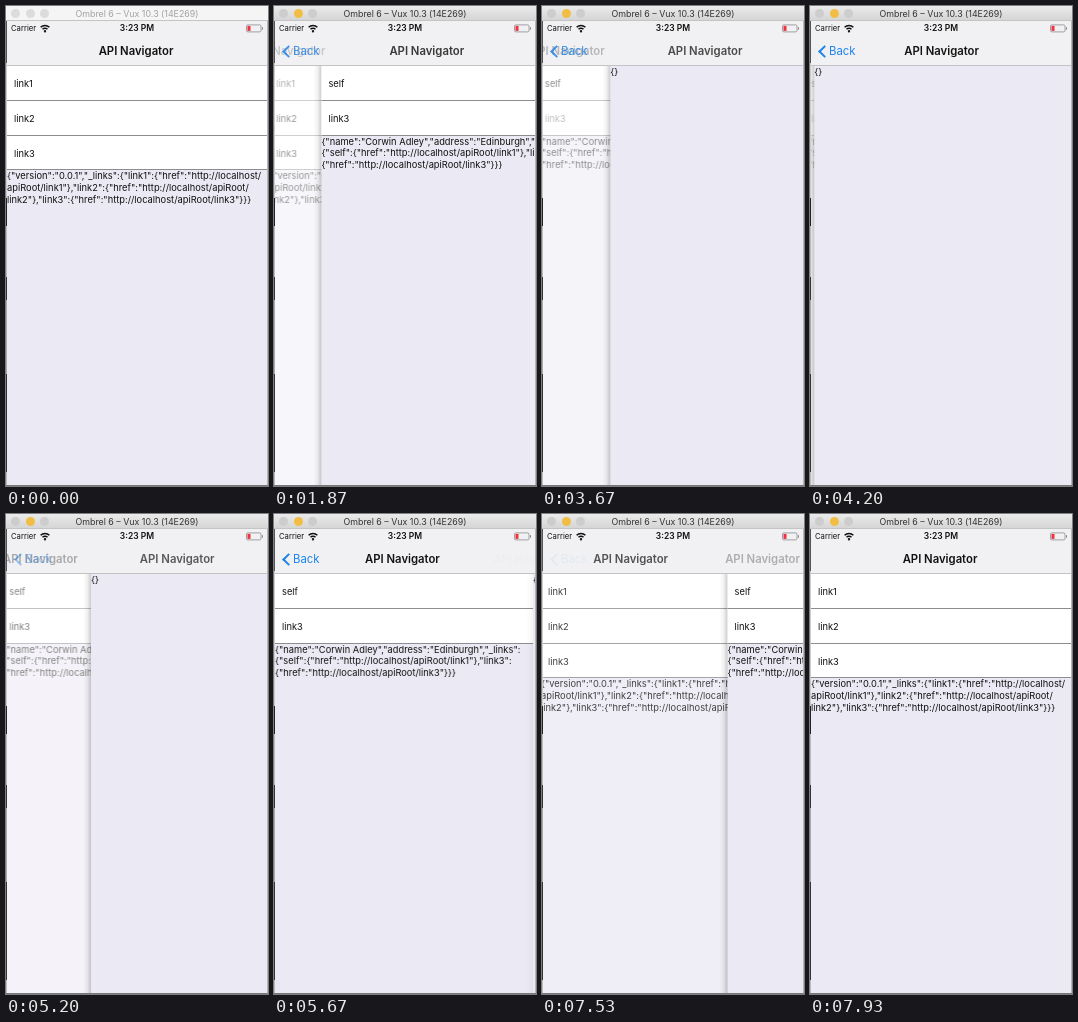
An HTML page for the animation above (8000 ms loop, 262 by 480 pixels).

```html
<!DOCTYPE html>
<html lang="en">
<head>
<meta charset="utf-8">
<title>API Navigator</title>
<style>
/* --a and --b: how far the second and third screens are pushed in */
@property --a { syntax: "<number>"; inherits: true; initial-value: 0; }
@property --b { syntax: "<number>"; inherits: true; initial-value: 0; }

html, body { margin: 0; width: 100%; height: 100%; overflow: hidden; background: #fff; }
#stage {
  position: relative; width: 262px; height: 480px; overflow: hidden;
  font: 9.32px/11.7px Inter, Roboto, sans-serif; color: #111;
  animation: 8s cubic-bezier(.19, .71, .45, .95) infinite;
  animation-name: first, second;
}
#stage * { position: absolute; box-sizing: border-box; white-space: pre; }

@keyframes first {
  0%, 22.45% { --a: 0; }
  22.46% { --a: .74; }
  31.6%, 91.75% { --a: 1; }
  99.06%, 100% { --a: 0; }
}
@keyframes second {
  0%, 45.82% { --b: 0; }
  45.83% { --b: .736; }
  55%, 64.25% { --b: 1; }
  71.6%, 100% { --b: 0; }
}

/* window frame */
#bar {
  left: 0; top: 0; width: 262px; height: 15px;
  background: linear-gradient(#ebebeb, #d5d5d5); border-bottom: 1px solid #c4c4c4;
}
#bar b {
  left: 0; width: 262px; top: 2px; text-align: center;
  font-weight: 400; font-size: 8.85px; color: #333;
}
#bar i { top: 3px; width: 9px; height: 9px; border-radius: 50%; background: #cdcdcd; }
#idle { inset: 0; background: #f5f5f5; animation: idle 8s step-end infinite; }
#idle b { color: #a2a2a2; }
#bar #idle i { background: #dcdcdc; }
@keyframes idle { 0% { opacity: 1; } 19.1%, 100% { opacity: 0; } }
#left {
  left: 0; top: 15px; width: 1px; height: 465px;
  background: linear-gradient(#555 0 9%, #ccc 9% 38%, #222 38% 44%, #bbb 44% 55%, #333 55% 60%, #aaa 60% 76%, #333 76% 97%, #bbb 97%);
}
#right { right: 0; top: 15px; width: 1px; height: 465px; background: #b5b5b8; }
#foot { left: 0; top: 479px; width: 262px; height: 1px; background: #77777a; }

/* status and navigation bars */
#head {
  left: 1px; top: 15px; width: 260px; height: 45px; overflow: hidden;
  background: #f1f1f3; border-bottom: 1px solid #c3c3c6;
}
#carrier { left: 4px; top: 2px; font-size: 7.7px; }
#clock { left: 0; width: 260px; top: 2px; text-align: center; font-size: 8.5px; font-weight: 600; }
#head svg { left: 0; top: 0; }
.title {
  left: -1px; width: 260px; top: 22px; line-height: 16px; text-align: center;
  font-size: 11.3px; font-weight: 600;
  opacity: var(--o); transform: translateX(var(--x));
}
.back { left: 0; top: 22px; width: 60px; height: 16px; opacity: var(--o); }
.back span { left: 18px; top: 0; font-size: 11.4px; line-height: 16px; color: #1b82ea; }
.back u {
  left: 9px; top: 3.5px; width: 9px; height: 9px; transform: rotate(45deg);
  border: solid #1b82ea; border-width: 0 0 2px 2px;
}
.press { inset: 0; }
.n0 { --o: calc(1 - var(--a)); --x: calc(var(--a) * -141px); }
.n1 {
  --o: calc(var(--a) * (1 - var(--b)));
  --x: calc((1 - var(--a)) * 128px - var(--b) * 141px);
}
.n2 { --o: var(--b); --x: calc((1 - var(--b)) * 128px); }
.n1 .press { animation: press1 8s step-end infinite; }
.n2 .press { animation: press2 8s step-end infinite; }
@keyframes press1 { 0% { opacity: 1; } 90.85%, 100% { opacity: .22; } }
@keyframes press2 { 0% { opacity: 1; } 61.6% { opacity: .22; } 72%, 100% { opacity: 1; } }

/* screens */
#body { left: 1px; top: 60px; width: 260px; height: 419px; overflow: hidden; background: #fff; }
.card {
  inset: 0; background: #ebe9f3;
  opacity: min(1 - .7 * var(--out, 0), (1 - var(--out, 0)) * 30);
  transform: translateX(calc((1 - var(--in, 1)) * 261px - var(--out, 0) * 7px));
}
.card::before {
  content: ""; position: absolute; left: -8px; top: 0; width: 8px; height: 100%;
  background: linear-gradient(90deg, #0000, #0000000d 50%, #0003); opacity: calc(var(--in, 0) * 20);
}
#c0 { --out: var(--a); }
#c1 { --in: var(--a); --out: var(--b); }
#c2 { --in: var(--b); }
#stage .row {
  position: relative; height: 34.8px; padding-left: 7px; line-height: 35.6px;
  background: #fff; border-bottom: 1px solid #8d8d90;
}
#stage .row span, #stage .json { position: relative; }
#tap1 { animation: tap1 8s step-end infinite; }
#tap2 { animation: tap2 8s step-end infinite; }
@keyframes tap1 { 0% { opacity: 1; } 19.1% { opacity: .75; } 31.6%, 100% { opacity: 1; } }
@keyframes tap2 { 0% { opacity: 1; } 40.85% { opacity: .55; } 55%, 100% { opacity: 1; } }
</style>
</head>
<body>
<div id="stage">
  <div id="body">
    <div class="card" id="c0"><div class="row"><span id="tap1">link1</span></div><div class="row"><span>link2</span></div><div class="row"><span>link3</span></div><div class="json">{"version":"0.0.1","_links":{"link1":{"href":"http://localhost/
apiRoot/link1"},"link2":{"href":"http://localhost/apiRoot/
link2"},"link3":{"href":"http://localhost/apiRoot/link3"}}}</div></div>
    <div class="card" id="c1"><div class="row"><span>self</span></div><div class="row"><span id="tap2">link3</span></div><div class="json">{"name":"Corwin Adley","address":"Edinburgh","_links":
{"self":{"href":"http://localhost/apiRoot/link1"},"link3":
{"href":"http://localhost/apiRoot/link3"}}}</div></div>
    <div class="card" id="c2"><div class="json">{}</div></div>
  </div>

  <div id="head">
    <div id="carrier">Carrier</div>
    <div id="clock">3:23 PM</div>
    <svg width="260" height="15" fill="none">
      <g stroke="#111" stroke-width="1.4">
        <path d="M33.600 6.300a6.200 6.200 0 0 1 8.800 0M35.500 8.300a3.500 3.500 0 0 1 5 0"/>
        <circle cx="38" cy="10.300" r=".5"/>
      </g>
      <rect x="239.500" y="3.900" width="14.500" height="7" rx="1.300" stroke="#8b8b8e" stroke-width=".8"/>
      <path d="M255.500 6.200v2.500" stroke="#8b8b8e"/>
      <rect x="240.500" y="4.900" width="3" height="5" fill="#f0323c"/>
    </svg>
    <div class="title n0">API Navigator</div>
    <div class="title n1">API Navigator</div>
    <div class="title n2">API Navigator</div>
    <div class="back n1"><div class="press"><u></u><span>Back</span></div></div>
    <div class="back n2"><div class="press"><u></u><span>Back</span></div></div>
  </div>

  <div id="bar">
    <i style="left:5px"></i>
    <i style="left:20px;background:#f2bd45"></i>
    <i style="left:34px"></i>
    <b>Ombrel 6 – Vux 10.3 (14E269)</b>
    <div id="idle">
      <i style="left:5px"></i><i style="left:20px"></i><i style="left:34px"></i>
      <b>Ombrel 6 – Vux 10.3 (14E269)</b>
    </div>
  </div>
  <div id="left"></div>
  <div id="right"></div>
  <div id="foot"></div>
</div>
</body>
</html>
```
